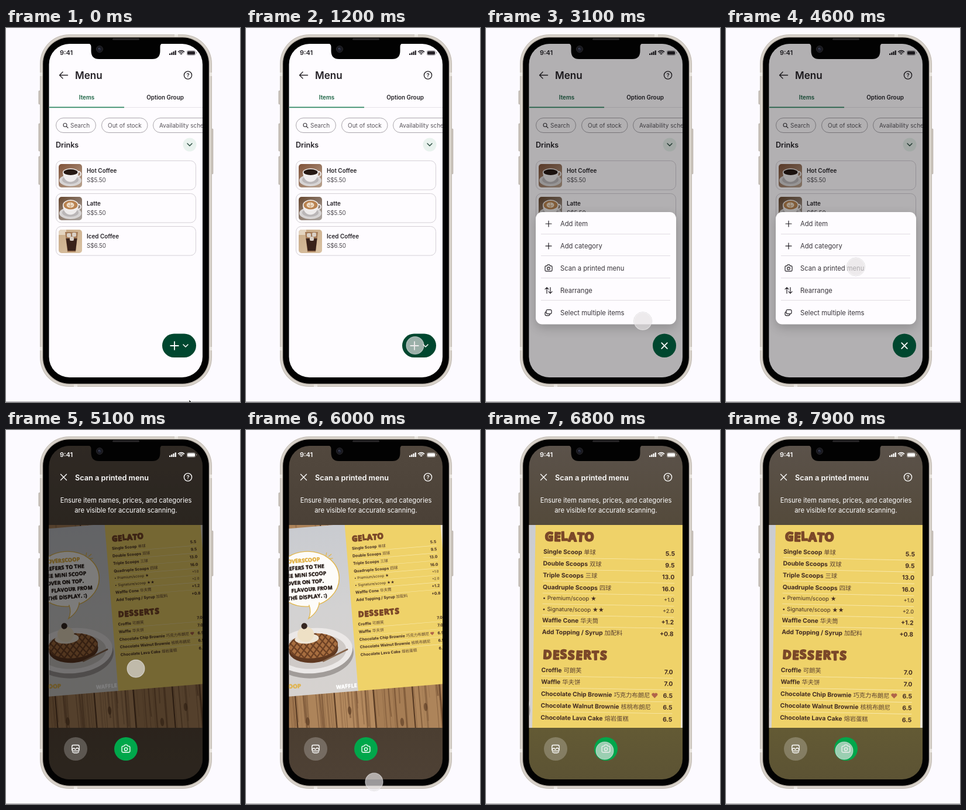
An HTML page with a canvas for the animation above (8 s loop, 400x638 px).

```html
<!DOCTYPE html>
<html lang="en">
<head>
<meta charset="utf-8">
<title>Scan a printed menu</title>
<style>
html, body { margin: 0; width: 100%; height: 100%; overflow: hidden; background: #fcfaff; }
canvas { display: block; width: 400px; height: 638px; }
</style>
</head>
<body>
<canvas id="stage"></canvas>
<script>
const W = 400, H = 638, LOOP = 8000;
const canvas = document.getElementById('stage');
const dpr = window.devicePixelRatio || 1;
canvas.width = W * dpr;
canvas.height = H * dpr;
const c = canvas.getContext('2d');

const INK = '#242126', GREEN = '#00472f', LIME = '#00a74b', BROWN = '#7b4829';
const UI = 'Inter, sans-serif';
const CJK = '"Noto Sans CJK SC", "Noto Sans CJK", sans-serif';
const HAND = '"Noto Sans", sans-serif';

const clamp = v => Math.max(0, Math.min(1, v));
const mix = (a, b, k) => a + (b - a) * k;
const span = (t, a, b) => clamp((t - a) / (b - a));
const smooth = k => k * k * (3 - 2 * k);
const easeOut = k => 1 - (1 - k) ** 2;
const mixRgb = (a, b, k) => `rgb(${a.map((v, i) => Math.round(mix(v, b[i], k)))})`;

function box(x, y, w, h, r, fill, line, lw = 1) {
  c.beginPath();
  c.roundRect(x, y, w, h, r);
  if (fill) { c.fillStyle = fill; c.fill(); }
  if (line) { c.strokeStyle = line; c.lineWidth = lw; c.stroke(); }
}

function oval(x, y, rx, ry, fill, line, lw = 1, turn = 0) {
  c.beginPath();
  c.ellipse(x, y, rx, ry, turn, 0, Math.PI * 2);
  if (fill) { c.fillStyle = fill; c.fill(); }
  if (line) { c.strokeStyle = line; c.lineWidth = lw; c.stroke(); }
}

const disc = (x, y, r, fill, line, lw) => oval(x, y, r, r, fill, line, lw);

function text(s, x, y, size, color, weight = 400, align = 'left', family = UI) {
  c.font = `${weight} ${size}px ${family}`;
  c.textAlign = align;
  c.textBaseline = 'alphabetic';
  c.fillStyle = color;
  c.fillText(s, x, y + size * 0.36);
  return c.measureText(s).width;
}

function icon(d, x, y, color, lw = 1.2) {
  c.save();
  c.translate(x, y);
  c.strokeStyle = color;
  c.lineWidth = lw;
  c.lineCap = c.lineJoin = 'round';
  c.stroke(new Path2D(d));
  c.restore();
}

const ICON = {
  back: 'M7 0H-7M-1.5 -5.5L-7 0L-1.5 5.5',
  close: 'M-5 -5L5 5M5 -5L-5 5',
  chevron: 'M-4 -2L0 2L4 -2',
  plus: 'M-5 0H5M0 -5V5',
  camera: 'M-6 -2.5a1.5 1.5 0 0 1 1.5 -1.5H-3l1.5 -2h3l1.5 2h1.5a1.5 1.5 0 0 1 1.5 1.5v6a1.5 1.5 0 0 1 -1.5 1.5h-9a1.5 1.5 0 0 1 -1.5 -1.5zM2.3 .4a2.3 2.3 0 1 1 -4.6 0a2.3 2.3 0 1 1 4.6 0',
  sort: 'M-3 5V-5M-6 -2L-3 -5L0 -2M3 -5V5M0 2L3 5L6 2',
  copy: 'M-2 -5h5a2 2 0 0 1 2 2v3a2 2 0 0 1 -2 2h-5a2 2 0 0 1 -2 -2v-3a2 2 0 0 1 2 -2M-4 -1.5a2 2 0 0 0 -2 2v2.5a2 2 0 0 0 2 2h4a2 2 0 0 0 2 -2v-1',
  gallery: 'M-4 -6.5h8a2.2 2.2 0 0 1 2.2 2.2v5.600a2.200 2.200 0 0 1 -2.200 2.200h-8a2.200 2.200 0 0 1 -2.200 -2.200v-5.600a2.200 2.200 0 0 1 2.200 -2.200M-6 1l3 -2.500l2.500 2.500l3 -3l3.500 3M-5.500 5q1 1.700 3 1.700h5q2 0 3 -1.700',
  search: 'M2 -1a3 3 0 1 1 -6 0a3 3 0 1 1 6 0M1.2 1.2L4 4'
};

function helpIcon(color) {
  disc(311, 80.5, 6.6, null, color, 1.4);
  text('?', 311, 80.8, 9.5, color, 600, 'center');
}

function statusBar(color) {
  text('9:41', 92, 42.5, 11, color, 600);
  c.fillStyle = color;
  for (let i = 0; i < 4; i++) c.fillRect(279 + i * 3.2, 43.5 - i * 1.7, 2.3, 2.5 + i * 1.7);
  for (const r of [2, 4.8, 7.4]) {
    c.beginPath();
    c.arc(299.5, 46, r, -Math.PI * 0.76, -Math.PI * 0.24);
    c.strokeStyle = color;
    c.lineWidth = 1.6;
    c.stroke();
  }
  box(310, 39.5, 13, 6, 1.6, color);
  c.save();
  c.globalAlpha *= 0.4;
  box(309, 38.5, 15, 8, 2.4, null, color, 0.8);
  c.fillRect(325, 41, 1.2, 2.6);
  c.restore();
}

// ---- menu list page ----

function thumb(x, y, kind) {
  c.save();
  c.beginPath();
  c.roundRect(x, y, 40, 40, 5);
  c.clip();
  c.translate(x, y);
  const g = c.createLinearGradient(0, 0, 30, 40);
  const tone = [['#805238', '#b49c88'], ['#68482f', '#a9a09a'], ['#c8aa86', '#d9c1a2']][kind];
  g.addColorStop(0, tone[0]);
  g.addColorStop(1, tone[1]);
  c.fillStyle = g;
  c.fillRect(0, 0, 40, 40);
  if (kind < 2) {
    oval(20, 28, 19, 10, '#d7d4d4');
    oval(20, 27, 14, 7, '#bab6b7');
    oval(34, 17, 4, 4, null, '#eeeaea', 2);
    c.beginPath();
    c.moveTo(7, 14);
    c.bezierCurveTo(8, 36, 32, 36, 34, 14);
    c.fillStyle = '#efecec';
    c.fill();
    oval(20.5, 14, 13.5, kind ? 9 : 6.5, '#f5f2f1');
    oval(20.5, 14, 12, kind ? 7.5 : 5, kind ? '#b98350' : '#251812');
    if (kind) {
      oval(20, 14, 6.5, 4.5, '#f0dfca');
      icon('M-4 0Q0 4 4 0M0 -4V4', 20, 14, '#c79b6c', 1);
    }
  } else {
    c.fillStyle = '#e3d4c0';
    c.fillRect(0, 0, 13, 9);
    c.beginPath();
    c.moveTo(11, 4); c.lineTo(33, 4); c.lineTo(29, 38); c.lineTo(15, 38);
    c.closePath();
    c.fillStyle = '#a37a57';
    c.fill();
    c.beginPath();
    c.moveTo(12.5, 15); c.lineTo(31.5, 15); c.lineTo(29, 36); c.lineTo(15.5, 36);
    c.closePath();
    c.fillStyle = '#39221a';
    c.fill();
    for (const [ix, iy] of [[14, 6], [23, 5], [19, 12]]) box(ix, iy, 7, 7, 2, '#d9cfc5');
  }
  c.restore();
}

function card(y, name, price, kind) {
  box(85.5, y + 0.5, 239, 49.5, 9, null, '#d4d0d6');
  thumb(90, y + 6, kind);
  text(name, 138, y + 17, 9.9, INK, 600);
  text(price, 138, y + 33.5, 9.8, '#4b474d');
}

function chip(x, w, label, tx) {
  box(x + 0.5, 153.5, w, 25, 12.5, null, '#aaa6ac');
  text(label, tx, 166, 10, '#59555b');
}

function listPage() {
  c.fillStyle = '#fefcff';
  c.fillRect(70, 24, 270, 576);
  statusBar(INK);
  icon(ICON.back, 98.5, 80.5, INK, 1.4);
  text('Menu', 118, 81, 17.1, INK, 600);
  helpIcon(INK);
  text('Items', 138, 118.5, 9.9, '#176040', 600, 'center');
  text('Option Group', 272, 118.5, 9.9, INK, 600, 'center');
  c.fillStyle = '#e6e2e8';
  c.fillRect(74, 135, 262, 1);
  c.fillStyle = '#2d8560';
  c.fillRect(74, 134.5, 128, 1.7);
  chip(85, 68, 'Search', 110);
  icon(ICON.search, 102, 166.5, '#3d393f', 1.1);
  chip(163, 78.5, 'Out of stock', 174);
  chip(251, 125, 'Availability schedule', 262);
  text('Drinks', 85, 199, 12.6, INK, 600);
  disc(314, 199, 11.5, '#e9f2ee');
  icon(ICON.chevron, 314, 199, '#24463a', 1.4);
  card(226, 'Hot Coffee', 'S$5.50', 0);
  card(282, 'Latte', 'S$5.50', 1);
  card(338, 'Iced Coffee', 'S$6.50', 2);
}

const ACTIONS = [
  ['plus', 'Add item'], ['plus', 'Add category'], ['camera', 'Scan a printed menu'],
  ['sort', 'Rearrange'], ['copy', 'Select multiple items']
];

function popup(alpha) {
  c.save();
  c.globalAlpha = alpha;
  c.shadowColor = 'rgba(0,0,0,.2)';
  c.shadowBlur = 18;
  c.shadowOffsetY = 6;
  box(85, 314, 240, 191.5, 11, '#fefcff');
  c.shadowColor = 'transparent';
  ACTIONS.forEach(([name, label], i) => {
    const y = 334 + i * 37.9;
    icon(ICON[name], 107, y, INK);
    text(label, 127, y, 11.2, '#38343a');
    if (i < 4) {
      c.fillStyle = '#e0dce2';
      c.fillRect(94, Math.round(y + 16.5), 221, 1);
    }
  });
  c.restore();
}

function fab(k) {
  const w = mix(58, 40, k);
  box(325 - w, 521.5, w, 40.5, 20.25, GREEN);
  c.save();
  c.translate(mix(288, 305, k), 542);
  c.rotate(k * Math.PI / 4);
  icon('M-6.8 0H6.8M0 -6.8V6.8', 0, 0, '#fff', 1.8);
  c.restore();
  c.save();
  c.globalAlpha *= 1 - k;
  icon(ICON.chevron, mix(307, 321, k), 542, '#fff', 1.5);
  c.restore();
}

// ---- camera page: printed sheet in its own coordinates ----

const ROWS = [
  [0, 'Single Scoop', '单球', '5.5'], [20, 'Double Scoops', '双球', '9.5'],
  [40, 'Triple Scoops', '三球', '13.0'], [60.5, 'Quadruple Scoops', '四球', '16.0'],
  [79, '• Premium/scoop ★', '', '+1.0'], [98, '• Signature/scoop ★★', '', '+2.0'],
  [117, 'Waffle Cone', '华夫筒', '+1.2'], [137, 'Add Topping / Syrup', '加配料', '+0.8'],
  [202, 'Croffle', '可朗芙', '7.0'], [222, 'Waffle', '华夫饼', '7.0'],
  [242.5, 'Chocolate Chip Brownie', '巧克力布朗尼', '6.5'],
  [262.5, 'Chocolate Walnut Brownie', '核桃布朗尼', '6.5'],
  [283, 'Chocolate Lava Cake', '熔岩蛋糕', '6.5']
];

function chunky(s, x, y, size, color, gap = 0, align = 'left', stroke = 2.2) {
  c.font = `700 ${size}px ${HAND}`;
  c.textAlign = 'left';
  c.textBaseline = 'alphabetic';
  c.fillStyle = c.strokeStyle = color;
  c.lineWidth = stroke;
  c.lineJoin = 'round';
  const widths = [...s].map(ch => c.measureText(ch).width + gap);
  if (align === 'right') x -= widths.reduce((a, b) => a + b, 0);
  [...s].forEach((ch, i) => {
    c.save();
    c.translate(x, y + size * 0.36 + Math.sin(i * 2.3) * size * 0.03);
    c.rotate(Math.sin(i * 1.7 + 1) * 0.05);
    c.strokeText(ch, 0, 0);
    c.fillText(ch, 0, 0);
    c.restore();
    x += widths[i];
  });
}

function heart(x, y) {
  c.fillStyle = '#b0644a';
  c.fill(new Path2D(`M${x} ${y + 4.5}l-4.5 -4.6a2.6 2.6 0 0 1 4.5 -3a2.6 2.6 0 0 1 4.5 3z`));
}

function wood() {
  let seed = 7;
  const rnd = () => (seed = (seed * 16807) % 2147483647) / 2147483647;
  for (let i = 0; i < 9; i++) {
    const x = -392 + i * 104;
    c.fillStyle = ['#b48a5f', '#a67d54', '#ad845a'][i % 3];
    c.fillRect(x, -250, 105, 900);
    for (let j = 0; j < 26; j++) {
      const gx = x + rnd() * 102, y = -250 + rnd() * 600, sway = rnd() * 14 - 7;
      c.beginPath();
      c.moveTo(gx, y);
      c.bezierCurveTo(gx + sway, y + 110, gx - sway, y + 220, gx, y + 330);
      c.strokeStyle = `rgba(82,50,28,${0.12 + rnd() * 0.3})`;
      c.lineWidth = 1 + rnd() * 4;
      c.stroke();
    }
    oval(x + 25 + rnd() * 50, 410 + rnd() * 60, 5, 11, 'rgba(72,42,22,.5)');
    c.fillStyle = '#553822';
    c.fillRect(x, -250, 3.2, 900);
  }
}

function photoPage() {
  const g = c.createLinearGradient(0, -66, 0, 378);
  g.addColorStop(0, '#c9cbd0');
  g.addColorStop(0.5, '#d3d2d2');
  g.addColorStop(1, '#d6d2cf');
  c.fillStyle = g;
  c.fillRect(-260, -66, 250, 444);
  oval(-125, 272, 107, 63, '#a19c99');
  oval(-125, 262, 105, 60, '#ebe8e7');
  oval(-125, 264, 88, 46, '#cfcac7');
  oval(-124, 258, 66, 36, '#5f3820');
  oval(-124, 249, 66, 33, '#a76e40');
  c.save();
  c.beginPath();
  c.ellipse(-124, 249, 66, 33, 0, 0, Math.PI * 2);
  c.clip();
  for (let i = -8; i < 9; i++) icon('M-30 -36L30 36M30 -36L-30 36', -124 + i * 17, 249, '#6d4124', 3.6);
  c.restore();
  oval(-139, 229, 32, 13, '#efe6d6');
  oval(-141, 217, 22, 20, '#eee0c5');
  disc(-143, 195, 8, '#352621');
  icon('M-100 292L-34 266', 0, 0, '#86654c', 4);

  const bubble = '#fdfcf9', gold = '#e2b64b';
  oval(-126, 71, 86, 73, bubble, gold, 2.2);
  c.beginPath();
  c.moveTo(-126, 140);
  c.quadraticCurveTo(-120, 160, -130, 176);
  c.quadraticCurveTo(-102, 160, -98, 135);
  c.fillStyle = bubble;
  c.fill();
  c.strokeStyle = gold;
  c.lineWidth = 2;
  c.stroke();
  icon('M0 8L2 1M7 11L14 6M9 17H17', -70, 5, gold, 2);
  const lines = ['REFERS TO THE', 'FREE MiNi SCOOP', 'OVER ON TOP.', 'FLAVOUR FROM', 'THE DiSPLAY. :)'];
  const ends = [-77, -73, -81, -60, -76];
  chunky('OVERSCOOP', -87, 21, 14, '#e0ae3c', 0.2, 'right', 0.9);
  lines.forEach((s, i) => chunky(s, ends[i], 40 + i * 19.6, 13.5, '#2b211d', 0.3, 'right', 0.9));
  chunky('SCOOP', -165, 352, 15, '#e0b34c', 0, 'right', 1);
  chunky('WAFFLE', -16, 363, 14, '#fff', 0.3, 'right', 0.8);
}

function pricePage() {
  c.fillStyle = '#e9e2d2';
  c.fillRect(238, -66, 9, 444);
  c.fillStyle = '#efd269';
  c.fillRect(-14, -66, 254, 444);
  chunky('GELATO', 2, -26, 20.5, BROWN, 0.8);
  chunky('DESSERTS', 2, 175.5, 20.5, BROWN, 1.7);
  ROWS.forEach(([y, name, han, price], i) => {
    const small = i === 4 || i === 5;
    const size = small ? 9.6 : 10.4, weight = small ? 400 : 700;
    const w = text(name, 0, y, size, '#422b22', weight);
    if (han) {
      const hw = text(han, w + 3, y, 10.3, '#5c4130', 400, 'left', CJK);
      if (i === 10) heart(w + hw + 11, y);
    }
    text(price, 225, y, small ? 9 : 10.4, '#422b22', weight, 'right');
    if (i !== 7 && i !== 12) {
      c.fillStyle = 'rgba(255,249,220,.6)';
      c.fillRect(0, y + 10, 225, 0.9);
    }
  });
}

function scanPage(t) {
  const k = smooth(span(t, 6080, 6720));
  const drift = span(t, 6800, 7900);
  const dark = 1 - smooth(span(t, 5100, 5600));
  c.save();
  c.beginPath();
  c.rect(70, 162, 270, 346);
  c.clip();
  c.save();
  c.translate(mix(181, 98, k), mix(202, 207.2, k));
  c.rotate((mix(-4.7, 0.95, k) + drift * 0.22) * Math.PI / 180);
  const zoom = mix(0.643, 1, k);
  c.scale(zoom, zoom);
  wood();
  photoPage();
  pricePage();
  c.restore();
  c.fillStyle = `rgba(0,0,0,${0.51 * dark})`;
  c.fillRect(70, 162, 270, 346);
  c.restore();

  const head = c.createLinearGradient(0, 27, 0, 162);
  head.addColorStop(0, mixRgb([82, 72, 62], [91, 82, 74], k));
  head.addColorStop(1, mixRgb([75, 65, 55], [84, 74, 59], k));
  c.fillStyle = head;
  c.fillRect(70, 24, 270, 138);
  const foot = c.createLinearGradient(0, 508, 0, 596);
  foot.addColorStop(0, mixRgb([75, 62, 49], [99, 90, 52], k));
  foot.addColorStop(1, mixRgb([78, 65, 53], [92, 83, 52], k));
  c.fillStyle = foot;
  c.fillRect(70, 508, 270, 92);
  c.fillStyle = `rgba(0,0,0,${0.43 * dark})`;
  c.fillRect(70, 24, 270, 138);
  c.fillRect(70, 508, 270, 92);

  statusBar('#fff');
  icon(ICON.close, 98.5, 80.5, '#fff', 1.4);
  text('Scan a printed menu', 118, 81, 12.7, '#fff', 600);
  helpIcon('#fff');
  text('Ensure item names, prices, and categories', 205, 120, 11.2, '#fff', 400, 'center');
  text('are visible for accurate scanning.', 205, 137, 11.2, '#fff', 400, 'center');
  disc(119, 544, 20, 'rgba(255,255,255,.23)');
  icon(ICON.gallery, 119, 544, '#fff', 1.4);
  disc(205, 544, 20, LIME);
  c.save();
  c.translate(205, 544);
  c.scale(1.15, 1.15);
  icon(ICON.camera, 0, 0, '#fff', 1.2);
  c.restore();
}

// ---- device and pointer ----

function body() {
  for (const [x, y, h] of [[55.8, 107, 23], [55.8, 163, 47], [55.8, 219, 48], [350.5, 172, 77]]) {
    box(x, y, 3.5, h, 1, '#c9c2ba', '#b3aca4', 0.6);
  }
  box(58, 11, 294, 601, 50, '#c0b9b1');
  box(59, 12, 292, 599, 49, '#d8d2ca');
  c.fillStyle = '#e9e5df';
  c.fillRect(58, 76, 6, 6);
  c.fillRect(346, 76, 6, 6);
  c.fillRect(58, 544, 6, 6);
  c.fillRect(346, 544, 6, 6);
  c.fillRect(288, 11, 6, 5);
  c.fillRect(116, 607, 6, 5);
  box(62, 15, 286, 593, 46, '#bbb3aa');
  box(63.2, 16.2, 283.6, 590.6, 45, '#020202');
  box(182, 17.5, 46, 3, 1.5, '#292729');
}

function notch() {
  c.fillStyle = '#020202';
  c.fill(new Path2D('M140 26H268Q263.5 27 263.5 32V39Q263.5 53 250 53H159Q145.5 53 145.5 39V32Q145.5 27 140 26Z'));
  disc(160, 36, 5.5, '#17171c', '#323037', 0.8);
  disc(160, 36, 2.6, '#242839');
  disc(159, 34.8, 0.8, '#626780');
}

const PATH = [
  [0, 313, 634], [1000, 290, 543], [1400, 288, 540], [2700, 288, 540], [3800, 222, 408],
  [5250, 222, 407], [5950, 219, 600], [6150, 219, 601], [6700, 203, 547], [8000, 202, 547]
];

function pointer(t) {
  const i = Math.max(1, PATH.findIndex(p => p[0] > t));
  const [t0, x0, y0] = PATH[i - 1], [t1, x1, y1] = PATH[i];
  const k = smooth(span(t, t0, t1));
  const x = mix(x0, x1, k), y = mix(y0, y1, k);
  if (t < 300) {
    c.beginPath();
    [[0, 0], [0, 13], [3, 10], [5.5, 15], [7.5, 14], [5, 9.5], [9, 9]].forEach(p => c.lineTo(x + p[0], y + p[1]));
    c.closePath();
    c.fillStyle = '#111';
    c.fill();
    c.strokeStyle = '#fff';
    c.lineWidth = 0.7;
    c.stroke();
    return;
  }
  disc(x, y, 15.6, null, 'rgba(60,55,60,.2)', 1);
  disc(x, y, 15, 'rgba(228,225,227,.68)', 'rgba(255,255,255,.5)', 1.2);
}

function draw(t) {
  c.setTransform(dpr, 0, 0, dpr, 0, 0);
  c.fillStyle = '#fcfaff';
  c.fillRect(0, 0, W, H);
  c.fillStyle = '#aaa8ab';
  c.fillRect(0, 637, W, 1);
  body();

  c.save();
  c.beginPath();
  c.roundRect(73.5, 27, 262.5, 569, 35);
  c.clip();
  const scan = smooth(span(t, 4720, 4980));
  if (scan < 1) {
    const open = easeOut(span(t, 1480, 1880));
    listPage();
    c.fillStyle = `rgba(0,0,0,${0.3 * open})`;
    c.fillRect(70, 24, 270, 576);
    if (open > 0) popup(open);
    fab(open);
  }
  if (scan > 0) {
    c.globalAlpha = scan;
    scanPage(t);
  }
  c.restore();

  notch();
  pointer(t);
}

const start = performance.now();
function tick() {
  draw((performance.now() - start) % LOOP);
  requestAnimationFrame(tick);
}
tick();
</script>
</body>
</html>
```
